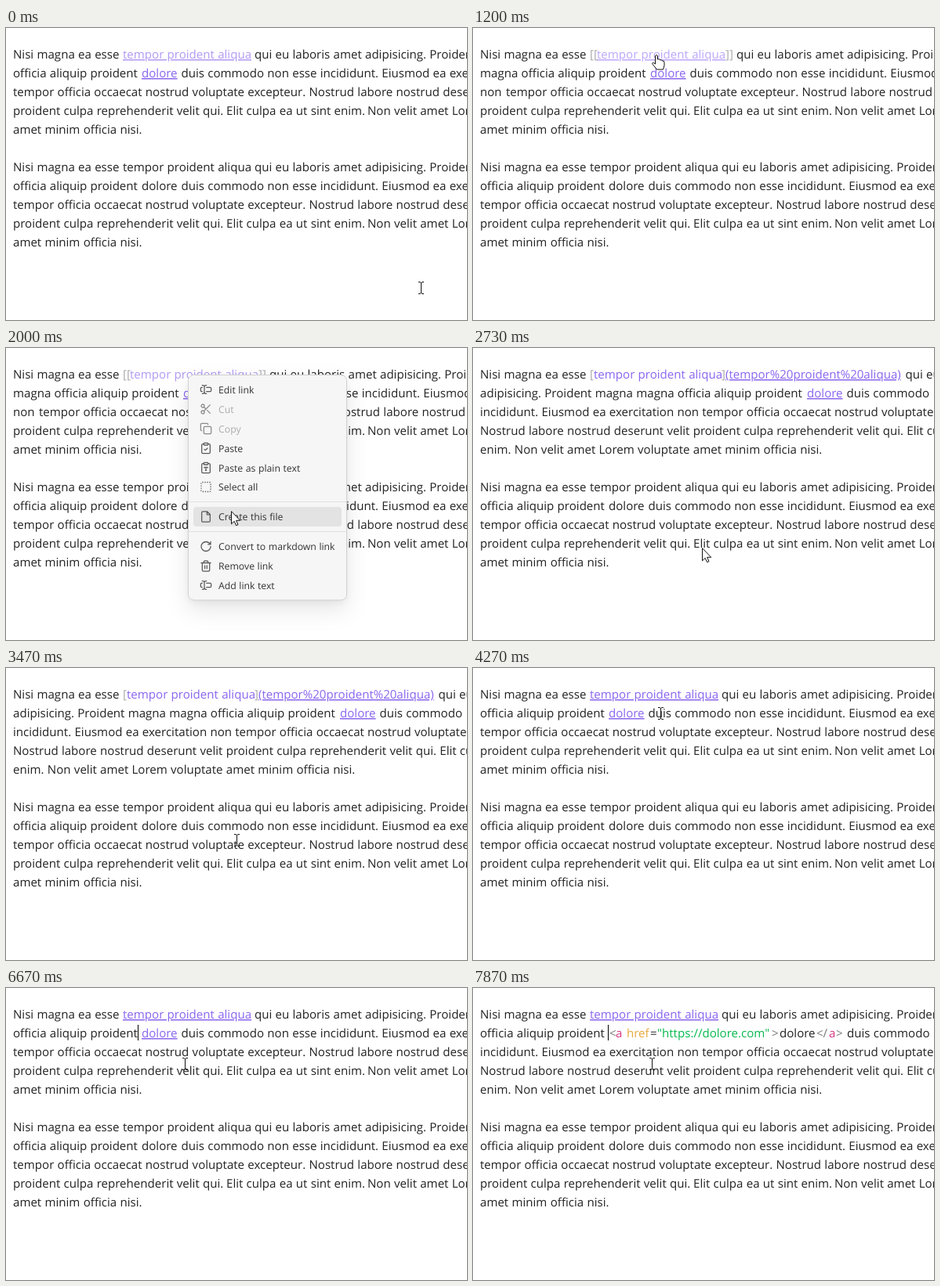
Write an HTML page that moves like this. It is 588 by 373 pixels and loops after 8 s.

```html
<!DOCTYPE html>
<html lang="en">
<head>
<meta charset="utf-8">
<title>Link context menu</title>
<style>
  html, body { margin: 0; width: 100%; height: 100%; overflow: hidden; background: #fff; }
  svg { display: block; width: 588px; height: 373px; overflow: hidden; }
  text {
    font-family: "Open Sans", "Noto Sans", sans-serif; font-size: 15.08px; word-spacing: .35px;
    font-variant-ligatures: none; text-rendering: geometricPrecision; fill: #222;
  }
  .link, .open { fill: #8a65ee; }
  .link, .faded, .hover, .edit-hover {
    text-decoration: underline; text-decoration-thickness: 1px; text-underline-offset: 2px;
  }
  .faded, .edit { fill: #8a65ee; opacity: .66; }
  .hover, .edit-hover { fill: #a68af9; opacity: .75; }
  .faded, .hover, .edit-hover { text-decoration-color: #8a65ee80; }
  .mark { fill: #ababab; }
  .punct { fill: #777; }
  .tag { fill: #d53984; }
  .attr { fill: #e8a83c; }
  .string { fill: #08b94e; }
  #menu text { font-size: 12.25px; fill: #333; }
  #menu .icon { fill: none; stroke: #5a5a5a; stroke-width: 1.9; stroke-linecap: round; stroke-linejoin: round; }
  #menu .off text { fill: #ababab; }
  #menu .off .icon { stroke: #8a8a8a; }
  .panel { fill: #f6f6f6; stroke: #d0d0d0; filter: drop-shadow(0 3px 5px #0000000d) drop-shadow(0 12px 14px #00000018); }
</style>
</head>
<body>
<svg viewBox="0 0 588 373">
  <g id="first"></g>
  <g id="second"></g>
  <rect id="caret" y="47" width="1" height="20" fill="#000"/>
  <g id="menu">
    <rect class="panel" x="232.5" y="34.5" width="202" height="287.5" rx="7"/>
    <path d="M233 196.5H434M233 234.5H434" stroke="#e0e0e0"/>
    <rect id="highlight" x="239" width="189" height="25" rx="4" fill="#e3e3e3"/>
    <g id="items"></g>
  </g>
  <g id="cursor">
    <path id="ibeam" d="M-3 -7.5H-1L.5 -6.5L2 -7.5H4M.5 -6.5V6.5M-3 7.5H-1L.5 6.5L2 7.5H4" fill="none" stroke="#111"/>
    <path id="arrow" d="M.5 .7V16.8L4.2 13.3L6.6 18.7L9 17.6L6.6 12.3H11.7Z" fill="#fff" stroke="#111"/>
    <path id="hand" d="M.5 9V1.5Q2 -.8 3.5 1.5V6Q6 4.8 6.6 7Q9 6 9.5 8Q12 7.5 12 10V14L10.5 19H2.5L-3.5 11.5Q-3 9 .5 12Z" fill="#fff" stroke="#111"/>
  </g>
</svg>
<script>
const LOOP = 8000, STEP = 1000 / 15;
const $ = id => document.getElementById(id);

// A line is a list of [x, text, class] runs.
const tailLines = [
  [[9, 'tempor officia occaecat nostrud voluptate excepteur. Nostrud labore nostrud deserunt velit']],
  [[9, 'proident culpa reprehenderit velit qui.'], [281, 'Elit culpa ea ut sint enim.'], [461, 'Non velit amet Lorem voluptate']],
  [[9, 'amet minim officia nisi.']]
];
const wrappedTail = [
  [[9, 'incididunt. Eiusmod ea exercitation non tempor officia occaecat nostrud voluptate']],
  [[9, 'Nostrud labore nostrud deserunt velit proident culpa reprehenderit velit qui. Elit culpa']],
  [[9, 'enim. Non velit amet Lorem voluptate amet minim officia nisi.']]
];
const start = [9, 'Nisi magna ea esse'];
const phrase = 'tempor proident aliqua';
const ending = 'qui eu laboris amet adipisicing. Proident magna';
const middle = 'duis commodo non esse incididunt. Eiusmod ea exercitation';
const before = [9, 'officia aliquip proident'];

const headLine = cls => [start, [149, phrase, cls], [317, ending]];
const plain = (phraseClass, wordClass) => [
  headLine(phraseClass),
  [before, [173, 'dolore', wordClass], [223.5, middle]],
  ...tailLines
];
const wikiLink = cls => [
  [start, [149, '[[', 'mark'], [158, phrase, cls], [322, ']]', 'mark'], [336, ending]],
  [[9, 'magna officia aliquip proident'], [226, 'dolore', 'link'], [276.5, middle]],
  [[9, 'non'], [42, tailLines[0][0][1]]],
  ...tailLines.slice(1)
];
const states = {
  resting: plain('faded', 'link'),
  hovered: plain('hover', 'link'),
  wikiHover: wikiLink('edit-hover'),
  wiki: wikiLink('edit'),
  markdown: [
    [start, [149, '[', 'mark'], [154, phrase, 'open'], [317, ']', 'mark'],
      [322, '(tempor%20proident%20aliqua)', 'link'], [551.5, 'qui eu laboris']],
    [[9, 'adipisicing. Proident magna magna officia aliquip proident'], [426, 'dolore', 'link'], [476.5, 'duis commodo']],
    ...wrappedTail
  ],
  resolved: plain('link', 'link'),
  html: [
    headLine('link'),
    [before, [174, '<', 'punct'], [182, 'a', 'tag'], [196, 'href', 'attr'], [226, '='],
      [235, '"https://dolore.com"', 'string'], [381, '>', 'punct'], [391, 'dolore'],
      [438, '</', 'punct'], [454, 'a', 'tag'], [463, '>', 'punct'], [477, 'duis commodo']],
    ...wrappedTail
  ]
};

const escapeText = s => s.replace(/&/g, '&amp;').replace(/</g, '&lt;');
const paragraph = (lines, top) => lines.map((runs, i) => runs.map(([x, s, cls = '']) =>
  `<text x="${x}" y="${top + i * 24}" class="${cls}">${escapeText(s)}</text>`).join('')).join('');

const path = d => `<path d="${d}"/>`;
const board = '<rect x="8" y="2" width="8" height="4" rx="1"/>' +
  path('M16 4h2a2 2 0 0 1 2 2v14a2 2 0 0 1-2 2H6a2 2 0 0 1-2-2V6a2 2 0 0 1 2-2h2');
const icons = {
  input: path('M5 4h1a3 3 0 0 1 3 3 3 3 0 0 1 3-3h1M13 20h-1a3 3 0 0 1-3-3 3 3 0 0 1-3 3H5M5 16H4a2 2 0 0 1-2-2v-4a2 2 0 0 1 2-2h1M13 8h7a2 2 0 0 1 2 2v4a2 2 0 0 1-2 2h-7M9 7v10'),
  cut: '<circle cx="6" cy="6" r="3"/><circle cx="6" cy="18" r="3"/>' + path('M20 4 8.1 15.9M14.5 14.5 20 20M8.1 8.1 12 12'),
  copy: '<rect x="8" y="8" width="14" height="14" rx="2"/>' + path('M4 16a2 2 0 0 1-2-2V4a2 2 0 0 1 2-2h10a2 2 0 0 1 2 2'),
  paste: board + path('M9 14l2 2 4-4'),
  plainPaste: board + path('M9 12v-1h6v1M11 17h2M12 11v6'),
  select: '<rect x="3" y="3" width="18" height="18" rx="2" stroke-dasharray="2 2.5" stroke-linecap="butt"/>',
  file: path('M14.5 2H6a2 2 0 0 0-2 2v16a2 2 0 0 0 2 2h12a2 2 0 0 0 2-2V7.5zM14 2v6h6'),
  convert: path('M21 12a9 9 0 1 1-9-9c2.5 0 4.9 1 6.7 2.7L21 8M21 3v5h-5'),
  trash: path('M3 6h18M19 6v14a2 2 0 0 1-2 2H7a2 2 0 0 1-2-2V6M8 6V4a2 2 0 0 1 2-2h4a2 2 0 0 1 2 2v2M10 11v6M14 11v6')
};
const items = [
  [53, 'input', 'Edit link'], [78, 'cut', 'Cut', 'off'], [103, 'copy', 'Copy', 'off'],
  [128, 'paste', 'Paste'], [153, 'plainPaste', 'Paste as plain text'], [177.5, 'select', 'Select all'],
  [215.5, 'file', 'Create this file'], [253.5, 'convert', 'Convert to markdown link'],
  [278.5, 'trash', 'Remove link'], [303, 'input', 'Add link text']
];
$('items').innerHTML = items.map(([y, icon, label, cls = '']) =>
  `<g class="${cls}"><g class="icon" transform="translate(247 ${y - 8}) scale(.667)">${icons[icon]}</g>` +
  `<text x="271" y="${y + 4.5}">${label}</text></g>`).join('');
$('second').innerHTML = paragraph(plain(), 183);

// Timelines hold [time, value...]; the last entry not after t applies.
const textTrack = [[0, 'resting'], [667, 'hovered'], [1200, 'wikiHover'], [1470, 'wiki'],
  [2730, 'markdown'], [4260, 'resolved'], [6860, 'html']];
const shapeTrack = [[0, 'ibeam'], [667, 'hand'], [1265, 'arrow'], [2795, 'ibeam']];
const caretTrack = [[0, 0], [5260, 136], [5730, 0], [6130, 145], [6330, 154], [6460, 163],
  [6660, 168], [6860, 172], [7330, 0], [7860, 172]];
const pointer = [[0, 529, 332], [30, 529, 332], [800, 232, 34], [1420, 232, 34], [1733, 271, 115],
  [2000, 287, 208], [2267, 292, 248], [2467, 292, 255], [3150, 292, 255], [3467, 294, 220],
  [3667, 298, 140], [3933, 152, 31], [4020, 152, 31], [4133, 239, 58], [4267, 239, 58],
  [4600, 245, 57], [4750, 245, 57], [5133, 141, 57], [5267, 141, 57], [5600, 228, 97], [LOOP, 228, 97]];

const at = (track, t) => track.findLast(k => k[0] <= t)[1];
const smooth = u => u * u * (3 - 2 * u);
function pointerAt(t) {
  const i = Math.max(1, pointer.findIndex(k => k[0] >= t));
  const [t0, x0, y0] = pointer[i - 1], [t1, x1, y1] = pointer[i];
  const linear = (t - t0) / (t1 - t0);
  const u = t0 < 1000 || t0 > 4000 ? smooth(linear) : linear;
  return [Math.round(x0 + (x1 - x0) * u), Math.round(y0 + (y1 - y0) * u)];
}
const show = (el, on) => el.setAttribute('visibility', on ? 'visible' : 'hidden');

let shownText;
function render(time) {
  const t = Math.floor((time % LOOP + 5) / STEP) * STEP % LOOP;
  const text = at(textTrack, t + 1), shape = at(shapeTrack, t + 1), caret = at(caretTrack, t + 5);
  const [x, y] = pointerAt(t);
  if (text !== shownText) {
    $('first').innerHTML = paragraph(states[text], 39);
    shownText = text;
  }
  const menuOpen = t > 1260 && t < 2730;
  $('menu').style.display = menuOpen ? '' : 'none';
  const hit = x >= 239 && items.find(([cy, , , off]) => !off && Math.abs(y - cy) < 12.5);
  $('highlight').style.display = hit ? '' : 'none';
  if (hit) $('highlight').setAttribute('y', hit[0] - 12.5);
  show($('caret'), caret);
  $('caret').setAttribute('x', caret);
  for (const id of ['ibeam', 'arrow', 'hand']) show($(id), id === shape);
  $('cursor').setAttribute('transform', `translate(${x} ${y})`);
}

const began = performance.now();
function tick() {
  render(performance.now() - began);
  requestAnimationFrame(tick);
}
tick();
</script>
</body>
</html>
```
